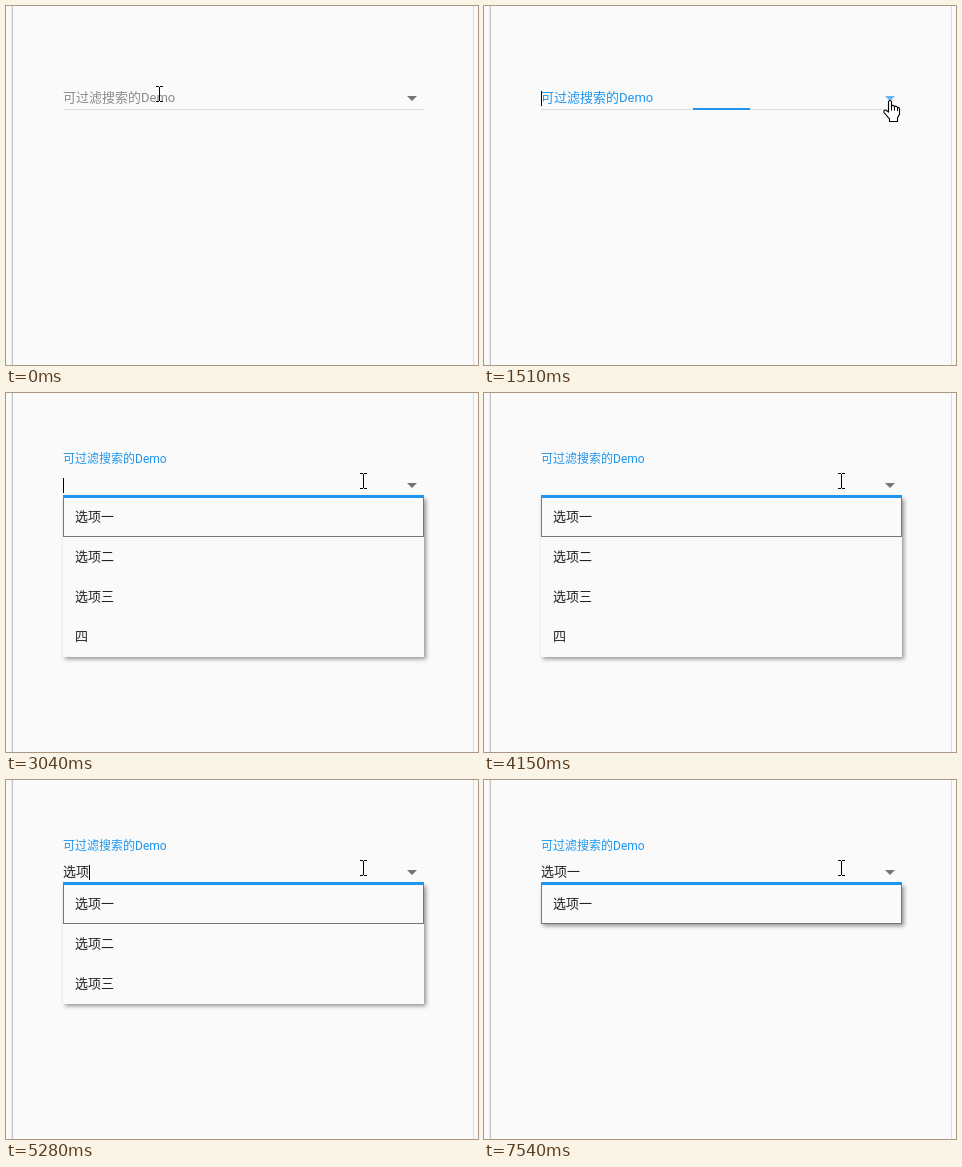
Write an HTML page that moves like this. It is 472 by 359 pixels and loops after 8000 ms.

```html
<!DOCTYPE html>
<html lang="zh">
<head>
<meta charset="utf-8">
<title>Filterable select demo</title>
<style>
  html, body { margin: 0; width: 100%; height: 100%; overflow: hidden; background: #fafafa; }
  svg { display: block; }
  text { font: 13px Roboto, "Noto Sans CJK SC", "Noto Sans CJK", sans-serif; white-space: pre; }
  .typed { font: bold 16px "Liberation Sans", sans-serif; fill: #0a5cc2; }
  .pick { font: 300 16px "Noto Sans CJK SC", "Noto Sans CJK", sans-serif; }
  .num { font: 13.33px "Liberation Mono", monospace; }
  .menu { filter: drop-shadow(2px 2px 2px rgba(0, 0, 0, .42)); }
</style>
</head>
<body>
<svg id="stage" width="472" height="359" viewBox="0 0 472 359"></svg>
<script>
const LOOP = 8000, LEFT = 57, WIDTH = 361, BLUE = '#1e96ee', INK = '#222';
const stage = document.getElementById('stage');
const pen = document.createElement('canvas').getContext('2d');

const options = ['选项一', '选项二', '选项三', '四'];
const start = {
  cursor: ['beam', 150, 80], focus: false, line: 0, float: 0, arrow: '#757575',
  list: [], text: '', comp: '', caret: false, popup: null
};
const ime = (typed, picks) => ({ typed, picks: picks.split(' ') });

// Each entry changes part of the state from its time on.
const steps = [
  [280, { cursor: ['beam', 173, 84] }],
  [430, { cursor: ['beam', 263, 94] }],
  [580, { cursor: ['beam', 325, 93] }],
  [700, { cursor: ['beam', 364, 93] }],
  [850, { cursor: ['arrow', 390, 107] }],
  [1100, { cursor: ['hand', 390, 102] }],
  [1240, { cursor: ['hand', 396, 97] }],
  [1360, { cursor: ['hand', 399, 94], arrow: '#9a9a9a' }],
  [1510, { focus: true, line: .158, caret: true, arrow: '#67b5ef' }],
  [1630, { line: .75, float: .62, list: options, arrow: '#9a9a9a' }],
  [1780, { line: .96, float: .93 }],
  [1910, { line: 1, float: 1 }],
  [2030, { caret: false }],
  [2640, { cursor: ['beam', 392, 85], caret: true, arrow: '#757575' }],
  [2770, { cursor: ['beam', 374, 81] }],
  [2920, { cursor: ['beam', 362, 80] }],
  [3040, { cursor: ['beam', 354, 80] }],
  [3190, { caret: false }],
  [3590, { caret: true }],
  [4150, { caret: false }],
  [4300, { caret: true, comp: 'x', popup: ime('x', '下 想 新 小 学') }],
  [4430, { comp: 'xua', popup: ime('xua', '选 玄 宣 旋 悬'), list: [] }],
  [4580, { comp: 'xuan', popup: ime('xuan', '选 玄 宣 旋 悬') }],
  [4730, { comp: 'xuanx', popup: ime("xuan'x", '选项 选型 选修 萱萱 玄学') }],
  [5130, { text: '选项', comp: '', popup: null }],
  [5280, { list: options.slice(0, 3) }],
  [5710, { caret: false }],
  [6270, { caret: true, comp: 'y', popup: ime('y', '有 用 要 也 页') }],
  [6390, { list: [] }],
  [6530, { comp: 'yi', popup: ime('yi', '一 以 已 亿 易') }],
  [6930, { text: '选项一', comp: '', popup: null }],
  [7080, { list: options.slice(0, 1) }],
  [7540, { caret: false }]
];

const rect = (x, y, w, h, fill, more = '') =>
  `<rect x="${x}" y="${y}" width="${w}" height="${h}" fill="${fill}" ${more}/>`;
const label = (x, y, str, fill, more = '') =>
  `<text x="${x}" y="${y}" fill="${fill}" ${more}>${str}</text>`;
const path = (d, stroke, width = 1, fill = 'none') =>
  `<path d="${d}" stroke="${stroke}" stroke-width="${width}" fill="${fill}"/>`;
const measure = (str, font) => {
  pen.font = font;
  return pen.measureText(str).width;
};
const fieldWidth = str =>
  measure(str, '13px Roboto, "Noto Sans CJK SC", "Noto Sans CJK", sans-serif');

const cursors = {
  beam: path('M0 .5H3M4 .5H7M0 15.5H3M4 15.5H7M3.5 1V15', '#000'),
  arrow: path('M.5 .5V16.5L4 13L6.5 18.5L9 17.5L6.5 12H11.5Z', '#000', 1, '#fff'),
  hand: path('M5.5 12V1.5Q7 -.5 8.5 1.5V6Q10 4.5 11.5 6.5Q13 5.5 14.5 7.5Q16.5 7 16.5 9.5V14' +
      'L14.5 18V21.5H6.5V19L1 12.5Q.5 9.5 3 10.2Z', '#000', 1.1, '#fff') +
    path('M8.5 6V10.5M11.5 6.5V10.5M14.5 7.5V11', '#000')
};

function menu(items) {
  if (!items.length) return '';
  return rect(LEFT, 104, WIDTH, items.length * 40, '#fafafa', 'class="menu"') +
    rect(LEFT + .5, 103.5, WIDTH - 1, 40, 'none', 'stroke="#777"') +
    items.map((item, i) => label(69, 128 + i * 40, item, INK)).join('');
}

function imeBox({ typed, picks }, x, y) {
  const pitch = 29 + picks[0].length * 16, w = 67 + pitch * 5;
  const typedEnd = 12 + measure(typed, 'bold 16px "Liberation Sans", sans-serif');
  const choices = picks.map((pick, i) => {
    const fill = i ? '#0a84d6' : '#e60f0f', px = 11 + i * pitch;
    return label(px, 47, i + 1 + '.', fill, 'class="num"') +
      label(px + 16, 47, pick, fill, 'class="pick"');
  }).join('');
  return `<g transform="translate(${x} ${y})">` +
    rect(.5, .5, w - 1, 55, '#fff', 'stroke="#b0b4ba"') +
    rect(1, 27, w - 33, 1, '#dcdfe3') +
    rect(w - 30, 2, 27, 27, '#f3a58c', `transform="rotate(-10 ${w - 16.5} 15.5)"`) +
    label(11, 20, typed, '#0a5cc2', 'class="typed"') +
    rect(Math.round(typedEnd - 1), 5, 1, 19, INK) + choices +
    path(`M${w - 46} 37.5l-4 4l4 4`, '#ccc', 1.8) +
    path(`M${w - 35} 37.5l4 4l-4 4`, '#f0704a', 2.2) +
    path(`M${w - 19} 40l4 4l4 -4`, '#f0704a', 2.2) + '</g>';
}

function scene(s) {
  const startX = LEFT + fieldWidth(s.text);
  const endX = LEFT + fieldWidth(s.text + s.comp);
  const lineW = WIDTH * s.line;
  const popupX = s.text ? 83 : LEFT;
  return rect(0, 0, 472, 359, '#fafafa') +
    rect(5, 0, 1, 359, '#e9e9e9') + rect(6, 0, 1, 359, '#c4c4c4') +
    rect(467, 0, 1, 359, '#dcdcdc') +
    rect(LEFT, 103, WIDTH, 1, '#dedede') +
    label(LEFT, 96 - 26.5 * s.float, '可过滤搜索的Demo', s.focus ? BLUE : '#8a8a8a',
      `style="font-size:${13 - s.float}px"`) +
    `<path d="M401 90H411L406 95Z" fill="${s.arrow}"/>` +
    menu(s.list) +
    rect(LEFT + (WIDTH - lineW) / 2, 102, lineW, s.list.length ? 3 : 2, BLUE) +
    label(LEFT, 96, s.text + s.comp, INK) +
    rect(startX, 98, endX - startX, 1, INK) +
    (s.caret ? rect(Math.round(endX), 85, 1, 15, '#000') : '') +
    (s.popup ? imeBox(s.popup, popupX, s.text ? 99 : 100) : '') +
    `<g transform="translate(${s.cursor[1]} ${s.cursor[2]})">${cursors[s.cursor[0]]}</g>`;
}

let shown = -1;
function tick() {
  const t = performance.now() % LOOP;
  const past = steps.filter(([time]) => time <= t);
  if (past.length !== shown) {
    shown = past.length;
    stage.innerHTML = scene(Object.assign({}, start, ...past.map(step => step[1])));
  }
  requestAnimationFrame(tick);
}
tick();
</script>
</body>
</html>
```
